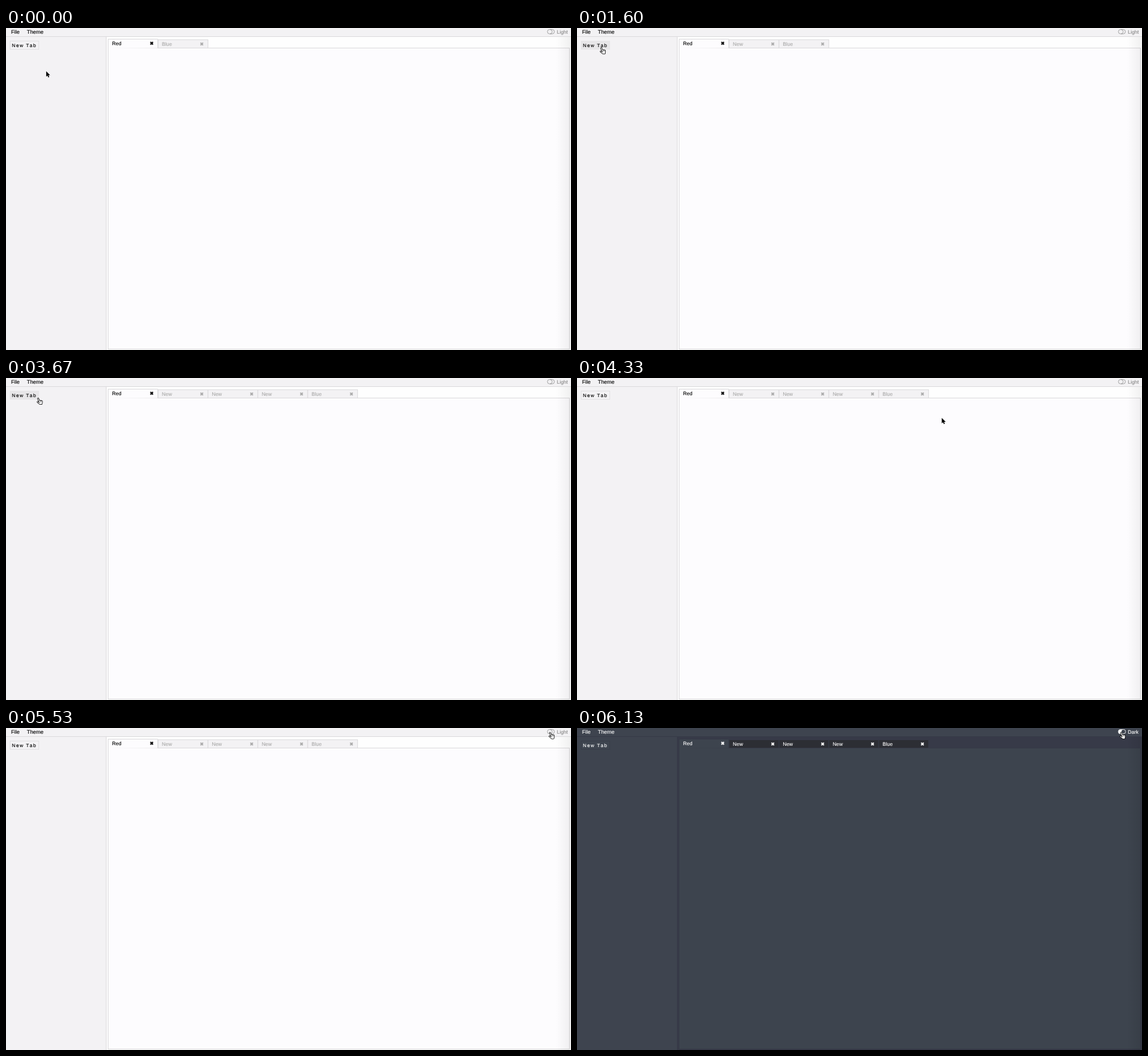
Recreate the animation shown at these times as an HTML page. Size 888x506 px, loop 8 s.

```html
<!DOCTYPE html>
<html lang="en">
<head>
<meta charset="utf-8">
<title>Tabs and theme switch</title>
<style>
  html, body { margin: 0; width: 100%; height: 100%; overflow: hidden; }
  svg { display: block; }
  #app {
    --bar: #f3f2f4; --strip: #fefefe; --panel: #fdfcfe; --edge: #dcdbdd;
    --tab: #f3f2f4; --tab-text: #aaa; --text: #000; --muted: #8c8c8c;
    --hover: #e7e6e8; --button-edge: #e2e1e3; --shade: .055;
  }
  #app.dark {
    --bar: #3e444f; --strip: #373a48; --panel: #3d444e; --edge: #363a47;
    --tab: #2c2e34; --tab-text: #fff; --text: #fff; --muted: #fff;
    --button-edge: #383c48; --shade: .09;
  }
  text {
    font: 7.9px "Liberation Sans", Arial, sans-serif;
    text-rendering: geometricPrecision;
    fill: var(--ink, var(--text));
    stroke: var(--ink, var(--text));
    stroke-width: .12;
  }
  .menu { font-size: 8.4px; }
  .bar { fill: var(--bar); }
  .strip { fill: var(--strip); }
  .panel { fill: var(--panel); stroke: var(--edge); }
  .rule { fill: none; stroke: var(--edge); }
  .tab { --ink: var(--tab-text); }
  .tab rect { fill: var(--tab); stroke: var(--edge); }
  .active path { fill: var(--panel); stroke: var(--edge); }
  use { stroke: var(--ink, var(--text)); }
  #button rect { fill: none; stroke: var(--button-edge); }
  #button text { font-size: 7.6px; letter-spacing: 1.2px; font-kerning: none; }
  #button.hover rect { fill: var(--hover); stroke: var(--hover); }
  #button.pressed { --ink: #444; }
  #label { --ink: var(--muted); }
  .off { fill: none; stroke: var(--muted); stroke-width: .75; }
  .on { display: none; fill: var(--muted); }
  .dark .on { display: inline; }
  .dark .off { display: none; }
  .knob { fill: var(--bar); }
  .arrow { fill: #000; stroke: #fff; stroke-width: .6; paint-order: stroke; }
  .hand { stroke-linecap: round; stroke-linejoin: round; }
  .hand use { stroke: #000; stroke-width: 2.6; }
  .hand use + use { stroke: #fff; stroke-width: 1.1; }
</style>
</head>
<body>
<svg id="app" width="888" height="506" viewBox="0 0 888 506">
  <defs>
    <path id="close" d="M-2 -2L2 2M2 -2L-2 2" stroke-width="1.9"/>
    <path id="fingers" fill="#fff" d="M-1 1.3L1.6 7M2 5V8M3.5 5V8M4.8 5.4V8M-1.7 6.6L1.2 9M1.6 8H4.7L4.4 9.6H1.8Z"/>
    <linearGradient id="fade">
      <stop offset="0" stop-opacity="0"/>
      <stop offset="1" style="stop-opacity: var(--shade)"/>
    </linearGradient>
  </defs>

  <rect class="strip" width="888" height="506"/>
  <rect class="bar" width="157" height="506"/>
  <rect class="bar" width="888" height="13"/>
  <path class="rule" d="M0 13.5H888M157.5 14V506"/>
  <rect class="panel" x="160.5" y="31.5" width="725" height="473"/>
  <rect x="864" y="14" width="24" height="492" fill="url(#fade)"/>

  <text class="menu" x="8" y="8.9">File</text>
  <text class="menu" x="32.8" y="8.9">Theme</text>

  <g id="button">
    <rect x="6.5" y="20.5" width="45" height="13"/>
    <text x="9.3" y="29.5">New Tab</text>
  </g>

  <g id="tabs"></g>
  <g class="active">
    <path d="M160.5 32V17.5H238.5V31.5"/>
    <text x="166.8" y="26.5">Red</text>
    <use href="#close" x="229" y="24"/>
  </g>

  <g class="off">
    <rect x="850.9" y="2.4" width="11" height="6.8" rx="3.4"/>
    <path d="M855 2.4a3.4 3.4 0 0 1 0 6.8"/>
  </g>
  <g class="on">
    <rect x="850.5" y="2" width="12" height="7.6" rx="3.8"/>
    <circle class="knob" cx="858.7" cy="5.8" r="3"/>
  </g>
  <text id="label" x="865.8" y="8.5">Light</text>

  <g id="cursor">
    <path class="arrow" d="M0 0V8.6L2 6.8L3.3 9.8L4.8 9.1L3.5 6.3H6.2Z"/>
    <g class="hand"><use href="#fingers"/><use href="#fingers"/></g>
  </g>
</svg>
<script>
  const LOOP = 8000, TICK = 1000 / 15, TAB_WIDTH = 78.4, DARK_AT = 6070;

  const clicks = [
    { down: 1270, up: 1600 },
    { down: 2070, up: 2270 },
    { down: 2930, up: 3130 }
  ];

  // Each move eases the pointer tip from where it rests to (x, y).
  const rest = { x: 63.2, y: 68 };
  const moves = [
    { from: 0, to: 130, x: 53, y: 64, power: 1 },
    { from: 330, to: 730, x: 39, y: 30.3, power: 2 },
    { from: 3600, to: 3870, x: 566, y: 64, power: 4.4 },
    { from: 4270, to: 4870, x: 862, y: 14, power: 2 },
    { from: 5070, to: 5270, x: 850, y: 6.5, power: 2 },
    { from: 5400, to: 5530, x: 856, y: 6.5, power: 1 }
  ];

  const $ = selector => document.querySelector(selector);
  const app = $('#app'), button = $('#button'), cursor = $('#cursor');
  const arrow = $('.arrow'), hand = $('.hand'), label = $('#label'), tabs = $('#tabs');

  const easeInOut = (p, power) => p < .5
    ? (2 * p) ** power / 2
    : 1 - (2 - 2 * p) ** power / 2;

  // The pointer is only redrawn on ticks; the margin absorbs times rounded to 10 ms.
  const tickAt = t => Math.floor((t + 4) / TICK);

  function pointerAt(t) {
    let { x, y } = rest;
    for (const move of moves) {
      const first = tickAt(move.from), last = tickAt(move.to);
      const p = Math.min(1, Math.max(0, (tickAt(t) - first) / (last - first)));
      const eased = easeInOut(p, move.power);
      x += (move.x - x) * eased;
      y += (move.y - y) * eased;
    }
    return { x, y };
  }

  const tabMarkup = (name, i) => `
    <g class="tab" transform="translate(${160.6 + TAB_WIDTH * i} 0)">
      <rect x="0" y="18.5" width="${TAB_WIDTH}" height="13"/>
      <text x="6.1" y="27.8">${name}</text>
      <use href="#close" x="68.7" y="25.2"/>
    </g>`;

  let shownTabs = -1;
  function showTabs(count) {
    if (count === shownTabs) return;
    shownTabs = count;
    const names = [...Array(count).fill('New'), 'Blue'];
    tabs.innerHTML = names.map((name, i) => tabMarkup(name, i + 1)).join('');
  }

  function render(t) {
    const { x, y } = pointerAt(t);
    const overButton = x > 6 && x < 52 && y > 20 && y < 34;
    const overToggle = x > 849 && x < 884 && y < 10;
    const pointing = overButton || overToggle;
    const dark = t >= DARK_AT;

    cursor.setAttribute('transform', `translate(${x} ${y})`);
    arrow.style.display = pointing ? 'none' : '';
    hand.style.display = pointing ? '' : 'none';
    button.classList.toggle('hover', overButton);
    button.classList.toggle('pressed', clicks.some(({ down, up }) => t >= down && t < up));
    showTabs(clicks.filter(({ up }) => t >= up).length);
    app.classList.toggle('dark', dark);
    label.textContent = dark ? 'Dark' : 'Light';
  }

  const start = performance.now();
  function frame() {
    render((performance.now() - start) % LOOP);
    requestAnimationFrame(frame);
  }
  frame();
</script>
</body>
</html>
```
